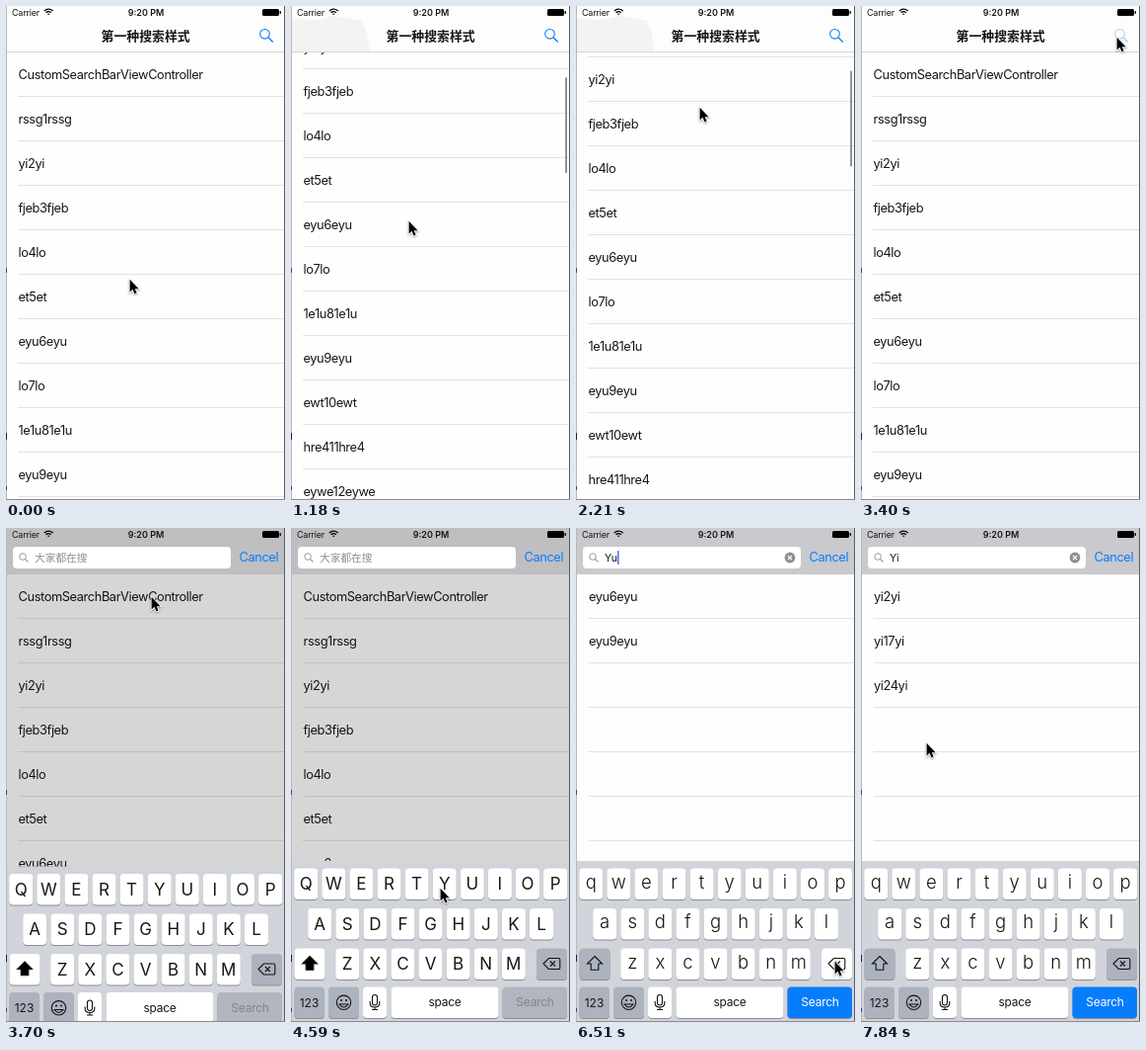
An HTML page with a canvas for the animation above (7.99 s loop, 283 by 500 pixels).

```html
<!DOCTYPE html>
<html lang="zh-CN">
<head>
<meta charset="utf-8">
<title>Search list</title>
<style>
  html, body { margin: 0; width: 100%; height: 100%; overflow: hidden; background: #fff; }
  canvas { display: block; width: 283px; height: 500px; }
</style>
</head>
<body>
<canvas id="stage"></canvas>
<script>
const W = 283, H = 500, LOOP = 7990, TICKS = 54;
const NAV = 46, ROW = 45, KEYBOARD = 337;
const BLUE = '#087dfb', GREY = '#8e8e93', DARK_KEY = '#adb3be', INK = '#161616';
const LATIN = 'Inter, "Noto Sans", sans-serif';
const CHINESE = '"Noto Sans CJK SC", "Noto Sans CJK", sans-serif';

const canvas = document.getElementById('stage');
const ratio = window.devicePixelRatio || 1;
canvas.width = W * ratio;
canvas.height = H * ratio;
const ctx = canvas.getContext('2d');
ctx.scale(ratio, ratio);

const ITEMS = ['CustomSearchBarViewController', 'rssg1rssg', 'yi2yi', 'fjeb3fjeb', 'lo4lo',
  'et5et', 'eyu6eyu', 'lo7lo', '1e1u81e1u', 'eyu9eyu', 'ewt10ewt', 'hre411hre4',
  'eywe12eywe', 'lo13lo', 'ery14ery', 'yi17yi', 'jy7622jy76', 'yi24yi'];

// tick, pointer x, pointer y, list scroll
const MOVES = [
  [0, 125, 276, 0], [2, 124, 335, 0], [8, 119, 217, 118], [10, 119, 199, 136],
  [12, 124, 51, 136], [15, 125, 102, 85], [19, 130, 187, 0], [22, 259, 31, 0],
  [23, 259, 31, 0], [25, 147, 69, 0], [31, 151, 364, 0], [36, 151, 364, 0],
  [39, 182, 364, 0], [41, 182, 364, 0], [43, 262, 438, 0], [45, 262, 438, 0],
  [46, 208, 356, 0], [48, 208, 356, 0], [53, 66, 217, 0]
];
// start tick, value; each holds until the next
const TYPED = [[0, ''], [34, 'Y'], [40, 'Yu'], [45, 'Y'], [47, 'Yi']];
const PRESSED = [[0, ''], [23, 'search'], [24, ''], [34, 'y'], [37, ''], [39, 'u'], [41, ''],
  [44, 'delete'], [46, 'i'], [48, '']];

const held = (track, tick) => track.filter(([start]) => start <= tick).pop()[1];

function moveAt(tick) {
  const next = MOVES.findIndex(m => m[0] >= tick);
  if (next <= 0) return MOVES[0].slice(1);
  const a = MOVES[next - 1], b = MOVES[next];
  const k = (tick - a[0]) / (b[0] - a[0]);
  return a.slice(1).map((v, i) => v + (b[i + 1] - v) * k);
}

function text(str, x, y, size, { color = INK, align = 'left', weight = 400, gap = 0, font = LATIN } = {}) {
  ctx.font = `${weight} ${size}px ${font}`;
  ctx.letterSpacing = gap + 'px';
  ctx.textAlign = align;
  ctx.fillStyle = color;
  ctx.fillText(str, x, y);
}

function rect(x, y, w, h, color) {
  ctx.fillStyle = color;
  ctx.fillRect(x, y, w, h);
}

function round(x, y, w, h, r, color) {
  ctx.beginPath();
  ctx.roundRect(x, y, w, h, r);
  ctx.fillStyle = color;
  ctx.fill();
}

function stroke(d, color, width = 1) {
  ctx.strokeStyle = color;
  ctx.lineWidth = width;
  ctx.stroke(new Path2D(d));
}

function at(x, y, draw) {
  ctx.save();
  ctx.translate(x, y);
  draw();
  ctx.restore();
}

function circle(x, y, r, color, width) {
  ctx.beginPath();
  ctx.arc(x, y, r, 0, 7);
  ctx.fillStyle = ctx.strokeStyle = color;
  if (width) { ctx.lineWidth = width; ctx.stroke(); } else ctx.fill();
}

function lens(x, y, r, tail, color, width) {
  circle(x, y, r, color, width);
  const d = r * 0.72;
  stroke(`M${x + d} ${y + d}l${tail} ${tail}`, color, width * 1.2);
}

function drawStatus() {
  text('Carrier', 6, 9.7, 9, { gap: -0.2 });
  text('9:20 PM', 142, 9.7, 9, { align: 'center', weight: 600 });
  ctx.strokeStyle = '#000';
  ctx.lineWidth = 1.3;
  for (const r of [1, 3.5, 6]) {
    ctx.beginPath();
    ctx.arc(43.2, 9.2, r, -Math.PI * 0.76, -Math.PI * 0.24);
    ctx.stroke();
  }
  round(260, 3, 17, 7, 1.5, '#000');
  round(277.6, 5, 1.4, 3, 0.7, '#000');
}

function drawRows(items, scroll, left) {
  for (let i = 0; i < 16; i++) {
    const y = NAV + i * ROW - scroll;
    if (items[i]) text(items[i], left, y + 27.8, 12.83, { gap: -0.41 });
    rect(left - 0.5, y + ROW, W, 1, '#e2e2e4');
  }
}

function drawNav(scroll, pressed) {
  rect(0, 0, W, NAV, '#fdfdfd');
  if (scroll > 60) {
    ctx.fillStyle = '#f3f3f3';
    ctx.fill(new Path2D('M0 13L28 14 44 10 72 15 77 28 80 46H0Z'));
  }
  rect(0, NAV, W, 1, '#d5d5d7');
  drawStatus();
  text('第一种搜索样式', 141.6, 35, 12.86, { align: 'center', weight: 700, font: CHINESE });
  ctx.globalAlpha = pressed ? 0.35 : 1;
  lens(262.5, 28.3, 4.8, 4.8, BLUE, 1.1);
  ctx.globalAlpha = 1;
}

function drawSearchBar(typed, caret) {
  rect(0, 0, W, NAV + 1, typed ? '#c9c9ce' : '#bfbfc2');
  drawStatus();
  round(7, 19, 221, 22, 4, '#fff');
  lens(17, 29, 3.3, 3, GREY, 0.9);
  text('Cancel', 236.5, 34.4, 12.83, { color: BLUE, gap: -0.41 });
  if (!typed) {
    text('大家都在搜', 29, 34, 10.7, { color: GREY, font: CHINESE });
    return;
  }
  text(typed, 29, 34, 10.6);
  if (caret) rect(29 + ctx.measureText(typed).width, 23, 1.5, 14, '#4a72e8');
  circle(217, 30, 5.4, GREY);
  stroke('M215 28l4 4m0-4l-4 4', '#fff', 1.1);
}

function key(x, y, w, color = '#fff') {
  round(x, y + 1, w, 31.5, 4, '#8b8d92');
  round(x, y, w, 31.5, 4, color);
}

function drawLetters(letters, firstX, y, upper) {
  [...letters].forEach((letter, i) => {
    const x = firstX + i * 28.1;
    key(x - 12, y, 24);
    if (upper) text(letter.toUpperCase(), x, y + 21.8, 17, { align: 'center' });
    else text(letter, x, y + 20.2, 18.5, { align: 'center', weight: 300 });
  });
}

function drawPopup(letter) {
  const x = 15.2 + 'qwertyuiop'.indexOf(letter) * 28.1;
  at(x, 0, () => {
    ctx.shadowColor = 'rgba(0,0,0,.35)';
    ctx.shadowBlur = 7;
    ctx.shadowOffsetY = 1;
    ctx.fillStyle = '#fdfdfd';
    ctx.fill(new Path2D('M-15 296H15Q22 296 22 303V328C22 340 12 339 12 350V372Q12 376 8 376H-8Q-12 376-12 372V350C-12 339-22 340-22 328V303Q-22 296-15 296Z'));
  });
  text(letter, x, 326, 28, { align: 'center', weight: 300 });
}

function drawKeyboard(typed, pressed) {
  const upper = !typed;
  rect(0, KEYBOARD, W, H, '#d1d4da');
  drawLetters('qwertyuiop', 15.2, 344.5, upper);
  drawLetters('asdfghjkl', 29.2, 385, upper);
  drawLetters('zxcvbnm', 57.2, 425.5, upper);

  key(3.5, 425.5, 31, upper ? '#fff' : DARK_KEY);
  at(19, 441, () => {
    const arrow = 'M0-7.5L7.5 0H3.8V6.3H-3.8V0H-7.5Z';
    if (upper) { ctx.fillStyle = '#000'; ctx.fill(new Path2D(arrow)); }
    stroke(arrow, '#111', 1.1);
  });

  key(249, 425.5, 31, pressed === 'delete' ? '#fff' : DARK_KEY);
  at(264.5, 441, () => stroke('M-8.5 0L-3-5.5H7Q8.3-5.5 8.3-4.2V4.2Q8.3 5.5 7 5.5H-3ZM-1.6-2.5l5 5m0-5l-5 5', '#111', 1.1));

  key(3.5, 464.5, 30.5, DARK_KEY);
  text('123', 18.5, 484.6, 12, { align: 'center' });

  key(38, 464.5, 31, DARK_KEY);
  circle(53.5, 480.3, 7.2, '#111', 1.1);
  circle(51, 478, 1, '#111');
  circle(56, 478, 1, '#111');
  stroke('M49 482Q53.5 488 58 482Z', '#111', 1.1);

  key(73, 464.5, 24);
  at(85, 480, () => {
    ctx.beginPath();
    ctx.roundRect(-2.5, -7.5, 5, 10.5, 2.5);
    ctx.strokeStyle = '#111';
    ctx.lineWidth = 1.1;
    ctx.stroke();
    stroke('M-4.8-1V1Q-4.8 5 0 5T4.8 1V-1M0 5V7.5M-3 7.5H3', '#111', 1.1);
  });

  key(101.5, 464.5, 109);
  text('space', 156, 484, 12, { align: 'center', gap: -0.25 });
  key(214.5, 464.5, 65.5, upper ? '#b0b5bf' : BLUE);
  text('Search', 247.5, 484.3, 12, { align: 'center', gap: -0.25, color: upper ? '#80858d' : '#fff' });

  if (pressed.length === 1) drawPopup(pressed);
}

function drawPointer(x, y) {
  at(x + 0.6, y + 0.8, () => {
    ctx.scale(0.88, 0.88);
    const arrow = new Path2D('M0 0V14.5L3.3 11.4 5.6 16.6 8 15.5 5.8 10.6H10.3Z');
    ctx.shadowColor = 'rgba(0,0,0,.35)';
    ctx.shadowBlur = 2;
    ctx.shadowOffsetY = 1;
    ctx.strokeStyle = '#fff';
    ctx.lineWidth = 2;
    ctx.stroke(arrow);
    ctx.shadowColor = 'transparent';
    ctx.fillStyle = '#000';
    ctx.fill(arrow);
  });
}

function drawEdges() {
  rect(0, 0, 1, H, '#b9b9bc');
  rect(0, 265, 1, 5, '#5b3b7c');
  rect(0, 432, 1, 7, '#20204c');
  rect(0, 486, 1, 4, '#5b3b7c');
  rect(W - 1, 0, 1, H, '#5c5c5f');
  rect(0, H - 1, W, 1, '#8a8a8c');
}

function draw(tick) {
  const [x, y, scroll] = moveAt(tick);
  const typed = held(TYPED, tick), pressed = held(PRESSED, tick);
  const searching = tick >= 24;

  rect(0, 0, W, H, '#fefefe');
  if (typed) drawRows(ITEMS.filter(item => item.includes(typed.toLowerCase())), 0, 13);
  else drawRows(ITEMS, scroll, 12.5);

  if (searching) {
    if (!typed) rect(0, NAV, W, H, `rgba(0,0,0,${tick === 24 ? 0.09 : 0.155})`);
    drawSearchBar(typed, tick % 7 < 4);
    const slide = tick === 24 ? 70 : tick === 25 ? 5.5 : 0;
    at(0, slide, () => drawKeyboard(typed, pressed));
  } else {
    if (tick > 2) {
      ctx.globalAlpha = Math.max(0, Math.min(1, (22 - tick) / 3));
      round(278.2, 48 + scroll * 0.205, 1.8, 97, 0.9, '#858587');
      ctx.globalAlpha = 1;
    }
    drawNav(scroll, pressed === 'search');
  }
  drawEdges();
  drawPointer(x, y);
}

// The picture advances in even, discrete ticks; the offset absorbs rounding of their times.
function frame(now) {
  const tick = Math.floor((now % LOOP) / LOOP * TICKS + 0.1) % TICKS;
  draw(tick);
  requestAnimationFrame(frame);
}
draw(0);
requestAnimationFrame(frame);
</script>
</body>
</html>
```
